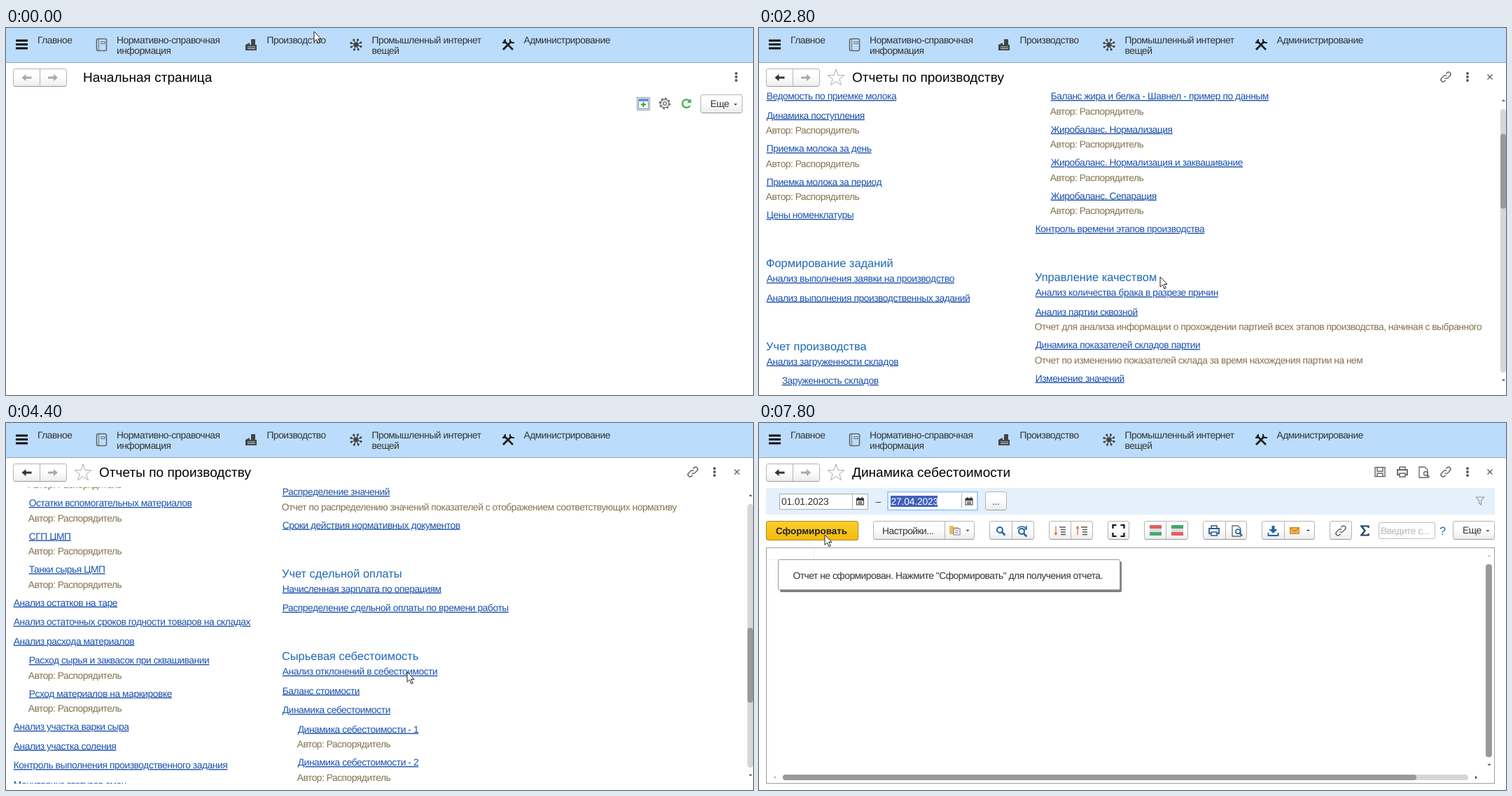
Recreate the animation shown at these times as an HTML page. Size 1067 px wide and 525 px high, loop 8000 ms.

```html
<!DOCTYPE html>
<html lang="ru">
<head>
<meta charset="utf-8">
<title>Отчеты по производству</title>
<style>
html, body { margin: 0; width: 100%; height: 100%; overflow: hidden; background: #fff; }
svg { display: block; width: 100vw; height: 100vh; }
text { font: 13.8px "Liberation Sans", Arial, sans-serif; letter-spacing: -.48px; fill: #333;
  white-space: pre; text-rendering: geometricPrecision; }
.title { font-size: 19px; letter-spacing: .03px; fill: #000; }
.head { font-size: 16.4px; letter-spacing: 0; fill: #1d68b4; }
.link { letter-spacing: -.43px; fill: #1a51ad; text-decoration: underline; text-decoration-skip-ink: none; }
.desc { fill: #80744f; }
.bold { font-size: 13.4px; font-weight: bold; letter-spacing: 0; fill: #222; }
.hint { fill: #b8b8b8; }
.date { letter-spacing: -.15px; }
.picked { fill: #fff; }
</style>
</head>
<body>
<svg id="stage" viewBox="0 0 1067 525"></svg>
<script>
const stage = document.getElementById('stage');

// Drawing helpers
const text = (x, y, s, cls = '') =>
  `<text x="${x}" y="${y + (/title|head/.test(cls) ? 6 : 5)}" class="${cls}">${s}</text>`;
const rect = (x, y, w, h, fill, more = '') =>
  `<rect x="${x}" y="${y}" width="${w}" height="${h}" fill="${fill}" ${more}/>`;
const path = (d, stroke = '#444', w = 1.5, fill = 'none') =>
  `<path d="${d}" stroke="${stroke}" stroke-width="${w}" fill="${fill}"/>`;
const solid = (d, fill = '#444') => path(d, 'none', 0, fill);
const ring = (r, stroke, w, more = '') =>
  `<circle r="${r}" fill="none" stroke="${stroke}" stroke-width="${w}" ${more}/>`;
const at = (x, y, s, more = '') => `<g transform="translate(${x} ${y}) ${more}">${s}</g>`;
const group = (id, s) => `<g id="${id}">${s}</g>`;

const button = (x, y, w, h = 27, fill = 'url(#face)') =>
  rect(x + .5, y + .5, w - 1, h - 1, fill, 'rx="2.5" stroke="#b4b4b4"') +
  path(`M${x + 2} ${y + h - .5}h${w - 4}`, '#989898', 1);
const split = (x, y = 140, h = 27) => path(`M${x + .5} ${y + 1}v${h - 2}`, '#b4b4b4', 1);
const dotted = (x, y, w, h) =>
  rect(x + .5, y + .5, w, h, 'none', 'stroke="#333" stroke-dasharray="1 1"');
const down = (x, y, fill = '#444', r = 2.5) => at(x, y, solid(`M${-r} ${-r / 2}h${2 * r}l${-r} ${r}z`, fill));
const up = (x, y, fill) => at(x, y, down(0, 0, fill), 'scale(1 -1)');
const cross = (x, y, r = 3.5) => at(x, y, path(`M${-r} ${-r}L${r} ${r}M${-r} ${r}L${r} ${-r}`, '#555', 1.2));
const star = (x, y, r, fill, stroke = 'none') => {
  const pts = Array.from({ length: 10 }, (_, i) => {
    const a = i * Math.PI / 5, q = i % 2 ? r * .4 : r;
    return `${(q * Math.sin(a)).toFixed(1)},${(-q * Math.cos(a)).toFixed(1)}`;
  });
  return at(x, y, `<polygon points="${pts.join(' ')}" fill="${fill}" stroke="${stroke}"/>`);
};
const gear = (x, y, c = '#666') => at(x, y, ring(5.8, c, 1.2) + ring(2.4, c, 1.2) +
  ring(7.2, c, 2, 'stroke-dasharray="2.8 2.85"'));
const lens = (x, y, c = '#1f65a8') => at(x, y,
  `<circle cx="-1" cy="-1" r="4" fill="none" stroke="${c}" stroke-width="2"/>` + path('M2 2l4.5 4.5', c, 2.6));
const chain = (x, y) => at(x, y, [0, 180].map(a => at(0, 0,
  path('M-3.5 3h-2a3 3 0 0 1 0-6h4.5a3 3 0 0 1 3 3', '#666', 1.5), `rotate(${a})`)).join(''), 'rotate(-45)');
const dots = x => [65, 70, 75].map(y => `<circle cx="${x}" cy="${y}" r="1.9" fill="#555"/>`).join('');
const page = (x, y) => at(x, y, path('M-6-7h8l4 4v11h-12z', '#666', 1.3));
const printer = (x, y, c) => at(x, y, path('M-4-3v-4h8v4M-4 2h8v5h-8z', c, 1.5) +
  path('M-4 4h-3v-7h14v7h-3', c, 1.8));
const calendar = (x, y) => at(x, y, rect(-5, -4, 10, 9, 'none', 'stroke="#333"') +
  solid('M-5-4h10v3h-10zM-3-6h1.5v2h-1.5zM2-6h1.5v2h-1.5z', '#333') +
  path('M-3 1h6M-3 3.3h6', '#444', 1.3));
const more = (x, y) => button(x, y, 60) + text(x + 14, y + 13, 'Еще') + down(x + 50, y + 14.5);

// Shared parts
const nav = (fill) => button(10, 58, 77, 26) + split(48, 58, 26) +
  at(29.5, 71, solid('M-7 0l6-5v3.5h8v3h-8v3.5z', fill)) +
  at(67, 71, solid('M7 0l-6-5v3.5h-8v3h8v3.5z', '#aaa'));
const caption = s => nav('#333') + star(110, 71.5, 12.5, '#fff', '#aaa') + text(133, 71, s, 'title') +
  chain(981, 70) + dots(1012) + cross(1044, 70);

const spokes = [20, 65, 110, 155].map(a => at(0, 0, path('M-7 0H7', '#444', 1.2) +
  '<circle cx="-7.5" r="1.6" fill="#444"/><circle cx="7.5" r="1.6" fill="#444"/>', `rotate(${a})`)).join('');
const sections = rect(0, 0, 1067, 49, '#bbddfb') + rect(0, 49, 1067, 1, '#8da7bd') +
  '<rect id="tab" x="325" width="151" height="50" fill="#fff"/>' +
  [18, 23.5, 29].map(y => rect(14, y - 1.5, 17, 3, '#111')).join('') +
  rect(129.5, 15.5, 14, 17, 'none', 'rx="2" stroke="#666" stroke-width="1.6"') +
  path('M132.5 16v16M136 19.5h5v3h-5z', '#777', 1.1) +
  at(350, 24, solid('M-8 0L-2-3V0H0V-8H6V0H8V8H-8z') + path('M-5 3h11M-5 5.5h11', '#b8cfe2', 1)) +
  at(500, 24, spokes + '<circle r="3.4" fill="#444"/>') +
  at(717, 24, path('M-6-6L7 7', '#222', 2.6) + path('M5-5L-7 7', '#222', 3) +
    path('M3-8v4l2 1h4M-8-3h4v-5', '#222', 2)) +
  text(45, 17, 'Главное') + text(158, 17, 'Нормативно-справочная') + text(158, 32, 'информация') +
  text(372.5, 17, 'Производство') + text(522.5, 17, 'Промышленный интернет') + text(522.5, 32, 'вещей') +
  text(739.5, 17, 'Администрирование');

const home = nav('#aaa') + text(110, 71, 'Начальная страница', 'title') + dots(1043) +
  dotted(901, 99, 18, 18) + rect(903.5, 102.5, 14, 13, '#fff', 'stroke="#5b87b5"') +
  rect(903, 101, 15, 4, '#5a9bd8') + path('M910.5 106v7M907 109.5h7', '#2fa52f', 2) + gear(941, 108) +
  at(972, 108, path('M5 3A5.8 5.8 0 1 1 4-4', '#3fae49', 2.2) + solid('M6.5-7v6h-6z', '#3fae49')) +
  more(992, 95);

// Section menu: "#" heading, "!" bold, "*" bold with a star
const menuColumn = (x, list) => {
  let y = 162;
  return list.trim().split('\n').map((s, i) => {
    if (s[0] === '#') {
      if (i) y += 24;
      y += 30;
      return text(x, y - 30, s.slice(1), 'head');
    }
    const strong = /^[!*]/.test(s);
    const row = text(x + 20.5, y, s.replace(/^[!*]/, ''), strong ? 'bold' : '') +
      (s[0] === '*' ? star(x + 8, y, 6.5, '#f5a833') : '');
    y += 25;
    return row;
  }).join('');
};

const menu = rect(741.5, 73.5, 249, 24, '#fff', 'rx="2" stroke="#aaa"') + split(968, 73, 25) +
  text(744, 85, 'Поиск (Ctrl+F)', 'hint') + cross(979.5, 85) + gear(1012, 85, '#444') + cross(1045, 85) +
  up(1063.5, 117, '#bbb') + rect(1059, 128, 8, 393, '#d6d6d6', 'rx="4"') +
  rect(1059, 128, 8, 137, '#999', 'rx="4"') +
  menuColumn(20, `
#Приемка сырья
!Поступления молочного сырья
!Приемка молока по качеству
!Приемка молока по количеству
Контрагенты
Сорта
Точки доставки
Акты расхождений
Акты расхождений при приемке молока
Виды рабочих центров
Поступления товаров и услуг
Рабочие центры
Смены
Соглашения с контрагентами
Типы транспортных средств`) +
  menuColumn(425, `
#Учет производства
!Распоряжения на перемещение
!Переработки
*Меню учетных точек
*Рабочее место мастера смены
!Рабочее место начальника склада
!Рабочее место технолога
Акты переработки
Закрытия смен
Инвентаризация
Маршруты водителей электрокаров
Рабочие центры
Разрешения на замену материалов
Распределения материалов
Резервирование товаров`) +
  menuColumn(816, `
#Отчеты
Баланс стоимости
#Сервис
Настройки параметров учета
Учет перемещений ТСД
Формирование инвентаризаций ТСД
Расчет плановых калькуляций
#Аналитика
Отчеты`) +
  group('menuFocus', star(824.5, 425.5, 6.5, '#999') + dotted(835, 416, 48, 18));

// Report list: "#" heading, ">" indented; after "|" a note, "@" stands for the author
const reportColumn = (x, list) => {
  let y = 140;
  return list.trim().split('\n').map((s, i) => {
    if (s[0] === '#') {
      if (i) y += 41.5;
      y += 22;
      return text(x, y - 22, s.slice(1), 'head');
    }
    const [name, note] = s.split('|'), sub = name[0] === '>';
    const left = x + (sub ? 22 : 0);
    const row = text(left + .7, y, sub ? name.slice(1) : name, 'link') +
      (note ? text(left - .3, y + 21.5, note === '@' ? 'Автор: Распорядитель' : note, 'desc') : '');
    y += note ? 47.5 : 27.5;
    return row;
  }).join('');
};

const finder = rect(9, 94.5, 325, 25, '#fff', 'stroke="#a3cdf0" stroke-width="2"') +
  rect(12.5, 99, 1, 15, '#222') + text(14, 107, 'Наименование, поле или автор отчета', 'hint') +
  split(289, 96, 23) + split(311, 96, 23) + down(300, 107.5) + cross(322, 107) +
  button(344, 93, 32) + lens(360, 106) +
  button(831, 93, 110) + rect(840.5, 99.5, 13, 14, '#fff', 'stroke="#5b87b5"') + rect(840, 99, 14, 3, '#5a9bd8') +
  at(847, 108, gear(0, 0, '#557'), 'scale(.6)') + text(862.5, 106, 'Настройка') +
  more(950, 93) + button(1020, 93, 32) + text(1032, 106, '?', 'bold');

const reports = caption('Отчеты по производству') +
  '<g clip-path="url(#view)"><g id="list">' + finder +
  reportColumn(10, `
#Приемка сырья
Анализ поступления молочного сырья
>Анализ поступления молочного сырья - Шавнел|@
Ведомость по приемке молока
Динамика поступления|@
Приемка молока за день|@
Приемка молока за период|@
Цены номенклатуры
#Формирование заданий
Анализ выполнения заявки на производство
Анализ выполнения производственных заданий
#Учет производства
Анализ загруженности складов
>Заруженность складов|@
Анализ заквашивания|@
Анализ остатков на складах
>Заквашивание|@
>Остатки вспомогательных материалов|@
>СГП ЦМП|@
>Танки сырья ЦМП|@
Анализ остатков на таре
Анализ остаточных сроков годности товаров на складах
Анализ расхода материалов
>Расход сырья и заквасок при сквашивании|@
>Рсход материалов на маркировке|@
Анализ участка варки сыра
Анализ участка соления
Контроль выполнения производственного задания
Мониторинг статусов смен`) +
  reportColumn(394, `
#Управление потерями (продолжение)
Баланс жира и белка
>Баланс жира и белка - Шавнел|@
>Баланс жира и белка - Шавнел - пример по данным|@
>Жиробаланс. Нормализация|@
>Жиробаланс. Нормализация и заквашивание|@
>Жиробаланс. Сепарация|@
Контроль времени этапов производства
#Управление качеством
Анализ количества брака в разрезе причин
Анализ партии сквозной|Отчет для анализа информации о прохождении партией всех этапов производства, начиная с выбранного
Динамика показателей складов партии|Отчет по изменению показателей склада за время нахождения партии на нем
Изменение значений|Отчет по изменению значений показателей в течении времени
Отчет по лабораторным анализам
Отчет по показателям складов
Прослеживаемость Материалы -> Продукция
Прослеживаемость Продукция -> Материалы
Распределение значений|Отчет по распределению значений показателей с отображением соответствующих нормативу
Сроки действия нормативных документов
#Учет сдельной оплаты
Начисленная зарплата по операциям
Распределение сдельной оплаты по времени работы
#Сырьевая себестоимость
Анализ отклонений в себестоимости
Баланс стоимости
Динамика себестоимости
>Динамика себестоимости - 1|@
>Динамика себестоимости - 2|@`) +
  group('linkFocus', dotted(393, 1102, 156, 14)) + '</g></g>' +
  group('toTop', up(1063.5, 103.5, '#444')) + down(1063.5, 504, '#444') +
  rect(1059, 116, 8, 377, '#d6d6d6', 'rx="4"') +
  '<rect id="thumb" x="1059" width="8" height="107" rx="4" fill="#999"/>';

const sorter = (x, dir) => at(x, 154, path('M-6-6v12', '#e0703a', 1.3) +
  solid(`M-8.5 ${3 * dir}h5l-2.5 ${4 * dir}z`, '#e0703a') +
  path('M-1-5h9M1-1.5h7M1 2h7M1 5.5h7', '#555', 1.4));
const stripes = (x, a, b) => rect(x - 8, 146, 17, 5, a) + rect(x - 8, 151, 17, 5, '#ddd') + rect(x - 8, 156, 17, 5, b);

const period = rect(10, 93, 1041, 38, '#e4f0fc') +
  rect(29.5, 101.5, 126, 22, '#fff', 'stroke="#aaa"') + split(133, 101, 23) + calendar(144.5, 112) +
  text(32, 112, '01.01.2023', 'date') + text(166.5, 112, '–') +
  rect(184, 98.5, 128, 26, '#fff', 'stroke="#a3cdf0" stroke-width="2"') + split(289, 100, 23) + calendar(300, 112) +
  rect(188, 104, 67, 16, '#4162bd') + text(188.5, 112, '27.04.2023', 'date picked') +
  button(323, 98, 31) + text(333, 112, '...') +
  at(1030, 111, path('M-5.5-5h11l-4 5v6l-3-2v-4z', '#8a9aaa', 1.2));

const toolbar = '<rect id="make" x="10.5" y="140.5" width="131" height="27" rx="2.5" stroke="#a88a1a"/>' +
  text(24, 154, 'Сформировать', 'bold') +
  button(163, 140, 145) + split(265) + text(176, 154, 'Настройки...') +
  at(279, 153, solid('M-7-6h5l2 2h6v10h-13z', '#e9bd5d') + rect(-1, -2, 9, 9, '#fff', 'stroke="#778"') +
    path('M1 1h5M1 4h5', '#778', 1)) + down(298, 154) +
  button(329, 140, 64) + split(361) + lens(345, 154) + lens(376, 156) +
  path('M369 151q6-6 13 0M382 147v5h-5', '#1f65a8', 1.6) +
  button(414, 140, 63) + split(445) + sorter(430, 1) + sorter(461, -1) +
  button(498, 140, 31) + at(513.5, 154, path('M-8-3v-5h5M3-8h5v5M8 3v5h-5M-3 8h-5v-5', '#111', 2.2)) +
  button(550, 140, 63) + split(581) + stripes(566, '#e35d5d', '#45aa69') + stripes(597, '#45aa69', '#e35d5d') +
  button(634, 140, 63) + split(666) + printer(650, 154, '#2b5a8a') + page(682, 154) +
  at(685, 156, lens(0, 0), 'scale(.8)') +
  button(718, 140, 76) + split(750) +
  at(734.5, 154, solid('M-2-7h4v5h4l-6 6-6-6h4z', '#1f65a8') + path('M-7 3v4h14v-4', '#1f65a8', 1.8)) +
  rect(758.5, 149.5, 13, 9, '#f1b04c', 'stroke="#c98524"') + path('M759 150l6 5 6-5', '#a86a17', 1) + down(784.5, 154) +
  button(815, 140, 32) + chain(831, 154) + path('M870.5 150v-2.5h-10l5 6.5-5 6.5h10v-2.5', '#1d3f60', 2.2) +
  rect(885.5, 142.5, 80, 23, '#fff', 'rx="2" stroke="#bbb"') + text(888, 154, 'Введите с...', 'hint') +
  text(972, 154, '?', 'head') + more(991, 140);

const sheet = rect(10.5, 178.5, 1040, 337, '#fff', 'stroke="#a0a0a0"') + path('M11 195.5h67M78.5 179v17', '#eee', 1) +
  rect(30, 198, 488, 44, '#808080', 'rx="2"') + rect(27.5, 195.5, 488, 43, '#fff', 'rx="2" stroke="#999"') +
  text(48.5, 218, 'Отчет не сформирован. Нажмите "Сформировать" для получения отчета.') +
  up(1043, 190, '#bbb') + down(1043, 489, '#444') + rect(1038, 202, 9, 276, '#999', 'rx="4"') +
  rect(34, 503, 979, 8, '#d6d6d6', 'rx="4"') + rect(34, 503, 905, 8, '#999', 'rx="4"') +
  at(22, 507, solid('M2-2.5v5l-3-2.5z', '#bbb')) + at(1025, 507, solid('M-2-2.5v5l3-2.5z', '#444'));

const report = caption('Динамика себестоимости') +
  at(887, 70, path('M-7-6.5h14v13h-14zM-4-6v5h8v-5M-4 6v-4h8v4', '#666', 1.4)) +
  printer(919, 70, '#666') + page(949, 70) + at(953, 73, lens(0, 0, '#666'), 'scale(.7)') +
  period + toolbar + sheet;

stage.innerHTML = `<defs>
  <linearGradient id="face" x2="0" y2="1"><stop offset=".4" stop-color="#fff"/><stop offset="1" stop-color="#ececec"/></linearGradient>
  <linearGradient id="gold" x2="0" y2="1"><stop stop-color="#ffe04a"/><stop offset="1" stop-color="#fbd01c"/></linearGradient>
  <linearGradient id="goldHot" x2="0" y2="1"><stop stop-color="#fdd02c"/><stop offset="1" stop-color="#f3b90c"/></linearGradient>
  <clipPath id="view"><rect y="92" width="1058" height="424"/></clipPath></defs>` +
  rect(0, 0, 1067, 525, '#fff') + sections +
  group('home', home) + group('menu', menu) + group('reports', reports) + group('report', report) +
  group('cursor',
    group('arrow', path('M0 0V14.5l3.4-3.2 2.6 5.7 2.3-1-2.6-5.5H10z', '#222', 1, '#fff')) +
    group('hand', path('M-1.5 1.5C-1.5-.5 1.5-.5 1.5 1.5V7l6 1.4q1.5.5 1.5 2.5v4L7 20H-1l-4.5-7q-.7-2 1-2.2l3 2z', '#222', 1, '#fff')) +
    group('busy', ring(6.5, '#1e88d8', 4.6) + group('glint', path('M0-6.5A6.5 6.5 0 0 1 6.5 0', '#7cc4f5', 2.4))));

// Timing in ms
const LOOP = 8000, STEP = 200;
const route = [[0, 440, 5], [400, 428, 22], [600, 432, 30], [1400, 868, 428], [1600, 870, 432], [2000, 866, 430],
  [2400, 573, 356], [4600, 573, 356], [5400, 475, 411], [5600, 475, 411], [5800, 474, 376],
  [7000, 421, 98], [7800, 94, 160], [LOOP, 94, 160]];
const wheel = [[2800, 2], [3000, 2], [3200, 1], [3400, 1], [3600, 1], [4200, 2], [4400, 1]];
const NOTCH = 70;

const el = id => document.getElementById(id);
const show = (id, on) => { el(id).style.display = on ? '' : 'none'; };
const move = (id, x, y) => el(id).setAttribute('transform', `translate(${x} ${y})`);

function cursorAt(t) {
  const i = route.findIndex(p => p[0] > t);
  const [t0, x0, y0] = route[i - 1], [t1, x1, y1] = route[i];
  const k = (t - t0) / (t1 - t0);
  return [x0 + (x1 - x0) * k, y0 + (y1 - y0) * k];
}

function draw(now) {
  const t = Math.floor(now % LOOP / STEP) * STEP;
  const current = t < 600 ? 'home' : t < 2000 ? 'menu' : t < 6400 ? 'reports' : 'report';
  for (const id of ['home', 'menu', 'reports', 'report']) show(id, id === current);
  show('tab', current === 'menu');
  show('menuFocus', t >= 1400);
  show('linkFocus', t >= 5600);

  const scroll = wheel.reduce((sum, [from, n]) => sum + (t >= from ? n * NOTCH : 0), 0);
  move('list', 0, -scroll);
  el('thumb').setAttribute('y', 116 + scroll * .253);
  el('toTop').setAttribute('opacity', scroll ? 1 : .35);
  el('make').setAttribute('fill', t >= 7600 ? 'url(#goldHot)' : 'url(#gold)');

  const busy = t >= 1600 && t < 2000, hand = t >= 4800 && t <= 5800;
  show('busy', busy);
  show('hand', hand);
  show('arrow', !busy && !hand);
  el('glint').setAttribute('transform', `rotate(${t * .45})`);
  move('cursor', ...cursorAt(t));
}

const start = performance.now();
(function tick() {
  draw(performance.now() - start);
  requestAnimationFrame(tick);
})();
</script>
</body>
</html>
```
